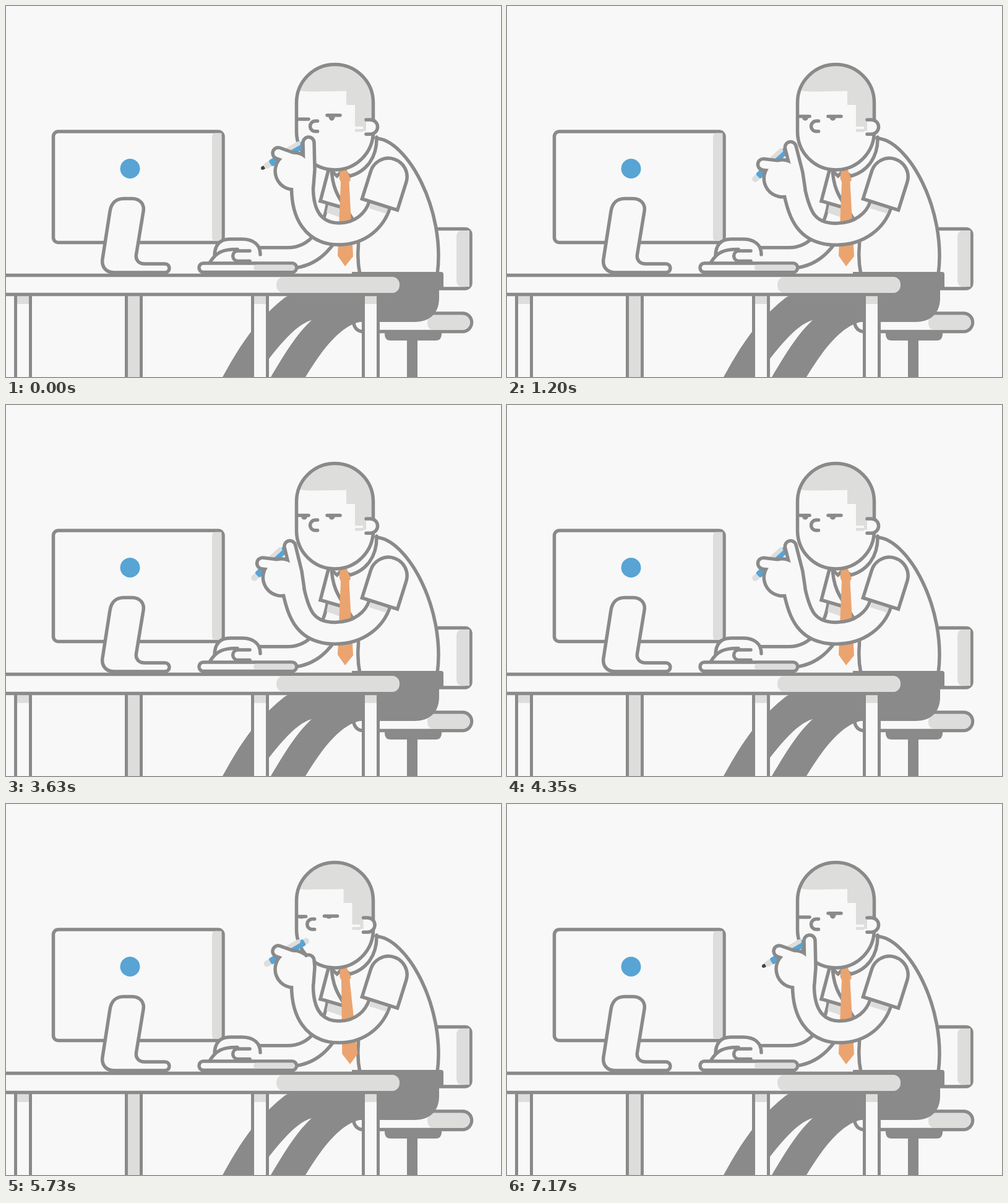
Recreate the animation shown at these times as an HTML page. Size 800 by 600 pixels, loop 7200 ms.

```html
<!DOCTYPE html>
<html lang="en">
<head>
<meta charset="utf-8">
<title>Thinking at the desk</title>
<style>
  html, body { margin: 0; width: 100%; height: 100%; overflow: hidden; background: #f8f8f8; }
  svg { display: block; width: 100vw; height: 100vh; }
  .o { fill: #f8f8f8; stroke: #8a8a8a; stroke-width: 5.5; stroke-linecap: round; }
  .l { fill: none; stroke: #8a8a8a; stroke-width: 5.5; stroke-linecap: round; }
  .limb { fill: none; stroke-linecap: round; }
  .p { fill: #f8f8f8; }
  .g { fill: #8a8a8a; }
  .s { fill: #dddddc; }
  .b { fill: #58a4d4; }
  .t { fill: #eba46f; }
</style>
</head>
<body>
<svg viewBox="0 0 800 600" xmlns="http://www.w3.org/2000/svg">
  <defs>
    <path id="skull" d="M469.5 156.5A62 62 0 0 1 593.5 156.5V203A62 62 0 0 1 469.5 203Z"/>
    <clipPath id="inHead"><use href="#skull"/></clipPath>
  </defs>
  <rect class="p" width="800" height="600"/>

  <!-- chair -->
  <rect class="o" x="640" y="360.5" width="111" height="96.5" rx="9"/>
  <path class="s" d="M749 363V454H738Q728 454 728 444V373Q728 363 738 363Z"/>
  <path class="g" d="M612 525H704V531Q704 541 694 541H665V600H648V541H622Q612 541 612 531Z"/>
  <rect class="o" x="562" y="497" width="190.5" height="29.5" rx="14.7"/>
  <path class="s" d="M692 499.7H738A12 12 0 0 1 738 523.8H692Q681 523.8 681 512Q681 499.7 692 499.7Z"/>

  <!-- monitor -->
  <rect class="o" x="76.5" y="203" width="274.5" height="179.5" rx="8"/>
  <path class="s" d="M339 205.5H348.5V380H339Q333 380 333 374V212Q333 205.5 339 205.5Z"/>
  <circle class="b" cx="200.5" cy="263" r="16"/>
  <path class="o" d="M257 431H174C162 431 154 422 156 409L168 332C170 319 178 311.5 190 311.5H204C216 311.5 224 320 222 332L210.5 402C209 411 215 417 224 417H257A7 7 0 0 1 257 431Z"/>

  <!-- far arm -->
  <g id="farArm"></g>
  <path class="s" d="M521 320L543 327V343L518 334Z"/>
  <path class="o" d="M522 262L508 315.5L546 326.5V262Z"/>

  <!-- trunk and trousers -->
  <path class="o" d="M598 214C648 216 711 330 697 434H572Q568 415 569 395C571 372 568 355 556 338C542 315 527 300 526 262Z"/>
  <path class="g" d="M559 430H703Q707 430 707 434V456H700V472C700 497 685 511 660 511H572C548 516 520 540 484 600H428C452 560 470 530 494 508C466 516 436 555 403 600H350C375 555 400 512 450 472L470 460H559Z"/>
  <path class="o" d="M599 212C600 245 582 268 556 275L541 265"/>
  <path class="l" d="M524 265L535 275L543 267"/>
  <path id="tie" class="t" d="M540 265H551L557 281L554.5 285L561 405L548 421L536 404L541 285L538.5 279Z"/>

  <!-- desk -->
  <g id="legs"></g>
  <rect class="o" x="-30" y="435.5" width="668" height="31" rx="14"/>
  <rect class="s" x="437" y="438" width="199" height="26" rx="12"/>

  <!-- keyboard and far hand -->
  <path class="o" d="M337 405C337 386 346 377 362 377H381C400 377 411 386 411 402"/>
  <path class="p" d="M340 400H408V416H340Z"/>
  <path class="o" d="M330 414C339 399 350 393 374 393.5"/>
  <path class="o" d="M394 396H374A8.3 8.3 0 0 0 374 412.5H394"/>
  <rect class="o" x="312" y="416" width="157.5" height="14.5" rx="7"/>
  <rect class="s" x="400" y="418.5" width="67" height="9.5" rx="4.7"/>

  <!-- head -->
  <use href="#skull" class="p"/>
  <g clip-path="url(#inHead)">
    <path id="hair" class="s" d="M440 60V128Q470 138 492 138.5L550 137.5V160H564V195H577V202H660V60ZM564 199H577V203.5H564Z"/>
    <g id="eyes"></g>
  </g>
  <use href="#skull" class="l"/>
  <path id="ear" class="o" d="M582 184H589A11.6 11.6 0 0 1 589 207.2H582"/>
  <path id="nose" class="o" d="M503.5 186H500A8.4 8.4 0 0 0 500 202.8H503.5"/>

  <!-- pen, near arm and hand, sleeve -->
  <g id="pen">
    <g id="tip">
      <path class="s" d="M-36 -4.5L-43 -2.5V2.5L-36 4.5Z"/>
      <ellipse cx="-43.5" rx="3.5" ry="3" fill="#444"/>
    </g>
    <rect class="s" x="-41" y="-5" width="83" height="10" rx="5"/>
    <rect class="b" x="-30" y="-5.7" width="64" height="11.4" rx="3"/>
    <rect class="s" x="3" y="-9" width="26" height="7" rx="3.5"/>
  </g>
  <g id="arm"></g>
  <g id="sleeve">
    <rect class="s" x="-14.5" y="0" width="29" height="11"/>
    <path class="o" d="M-30 0V-47A30 30 0 0 1 30 -47V0Z"/>
  </g>
</svg>
<script>
const LOOP = 7200, LINE = 5.5;
const SHOULDER = { x: 604, y: 321 };
const el = id => document.getElementById(id);
const set = (id, name, value) => el(id).setAttribute(name, value);
const clamp = x => Math.min(1, Math.max(0, x));
const mix = (a, b, k) => a + (b - a) * k;

// smooth 0 to 1 between two times
function ramp(t, from, to) {
  const x = clamp((t - from) / (to - from));
  return x * x * (3 - 2 * x);
}

// thumb lifts at one time and presses the pen at a later one
const click = (t, lift, press) =>
  ramp(t, lift, lift + 260) * (1 - clamp((t - press) / 420)) ** 4;

// thick strokes that merge into one outlined shape
function merge(parts) {
  return [["#8a8a8a", LINE], ["#f8f8f8", -LINE]].map(([color, grow]) =>
    parts.map(([d, width, move = ""]) =>
      `<path class="limb" d="${d}" stroke="${color}" stroke-width="${width + grow}" transform="${move}"/>`
    ).join("")).join("");
}

el("farArm").innerHTML = merge([["M536 322C530 362 505 407.5 455 407.5H405", 33.5]]);

el("legs").innerHTML = [15.5, 194.5, 398.5, 577.5].map((x, i) =>
  `<rect class="o" x="${x}" y="460" width="24" height="160" style="stroke-width:5"/>` +
  `<rect class="s" x="${x + 2.5}" y="469" width="19" height="${i === 1 ? 140 : 13}"/>`).join("");

const mouth = { x: 479, y: 294, turn: 0, ex: 538, ey: 368.5, sleeve: 17.5 };
const think = { x: 465, y: 302, turn: -13, ex: 532, ey: 369, sleeve: 17.5 };
const write = { x: 479, y: 349, turn: -39, ex: 541, ey: 397, sleeve: 7.5 };

function blend(a, b, k) {
  const pose = {};
  for (const key in a) pose[key] = mix(a[key], b[key], k);
  return pose;
}

function poseAt(t) {
  let pose = blend(mouth, think, ramp(t, 60, 750));
  pose = blend(pose, write, ramp(t, 4500, 5050));
  return blend(pose, mouth, ramp(t, 5130, 5745));
}

function armPath({ x, y, turn, ex, ey, sleeve }) {
  const rad = Math.PI / 180, drop = ey - y, reach = (ey - SHOULDER.y) * 0.55;
  const start = [x - Math.sin(turn * rad) * drop * 0.55, y + Math.cos(turn * rad) * drop * 0.55];
  const end = [SHOULDER.x - Math.sin(sleeve * rad) * reach, SHOULDER.y + Math.cos(sleeve * rad) * reach];
  return `M${x} ${y}C${start} ${mix(ex, x, 0.72)} ${ey} ${ex} ${ey}` +
    `C${mix(ex, SHOULDER.x, 0.54)} ${ey} ${end} ${SHOULDER.x} ${SHOULDER.y}`;
}

function eye(x0, x1, px, y) {
  const ry = Math.max(1, 185.5 - y);
  return `<path class="l" d="M${x0} ${y}H${x1}"/>` +
    `<path class="g" d="M${px - 5.5} ${y}A5.5 ${ry} 0 0 0 ${px + 5.5} ${y}Z"/>`;
}

function drawFace(t) {
  const dx = -28 * (ramp(t, 4500, 5000) - ramp(t, 5330, 5867));
  const wake = ramp(t, 6080, 6330);
  const squint = 1 - ramp(t, 60, 300) + wake;
  const shut = ramp(t, 5500, 5690) - wake;
  const blink = 4.5 * clamp(1 - Math.abs(t - 2640) / 70);
  el("eyes").innerHTML =
    eye(466, 489, 482, 178.5 + blink + 3.5 * shut + 4.5 * squint) +
    eye(519, 540, 526.5, 178.5 + blink + 2.7 * shut - 1.8 * squint);
  for (const id of ["hair", "eyes", "ear"]) set(id, "transform", `translate(${dx} 0)`);
  set("nose", "transform", `translate(${dx * 1.07} 0)`);
}

function drawArm(t) {
  const pose = poseAt(t);
  const lift = click(t, 60, 800) + click(t, 1800, 2080) + click(t, 3600, 3880) + click(t, 6200, 6760);
  const thumb = 1 - ramp(t, 4500, 4850) + ramp(t, 6150, 6550);
  const move = `translate(${pose.x} ${pose.y}) rotate(${pose.turn + 5 * lift})`;
  el("arm").innerHTML = merge([
    [armPath(pose), 35],
    ["M-14 -27h.01", 60, move],
    ["M-39 -56L0 -42", 18, move],
    [`M9 -4L11 -30L${10 + 8 * lift} ${mix(-41, -73, thumb)}`, 18, move]
  ]);
  set("sleeve", "transform", `translate(${SHOULDER.x} ${SHOULDER.y}) rotate(${pose.sleeve})`);
  set("pen", "transform", move + " translate(-26 -54) rotate(-30)");
  const clicked = t > 1800 && t < 4400 && lift > 0.3;
  set("tip", "visibility", t < 900 || t > 6850 || clicked ? "visible" : "hidden");
}

function drawTie(t) {
  const loose = Math.max(0, t - 6030);
  const swing = -3 * ramp(t, 4500, 5010) * Math.exp(-loose / 250) * Math.cos(loose / 110);
  set("tie", "transform", `rotate(${swing} 546 266)`);
}

function draw(t) {
  drawFace(t);
  drawArm(t);
  drawTie(t);
}

const start = performance.now();
function frame() {
  draw((performance.now() - start) % LOOP);
  requestAnimationFrame(frame);
}
draw(0);
requestAnimationFrame(frame);
</script>
</body>
</html>
```
